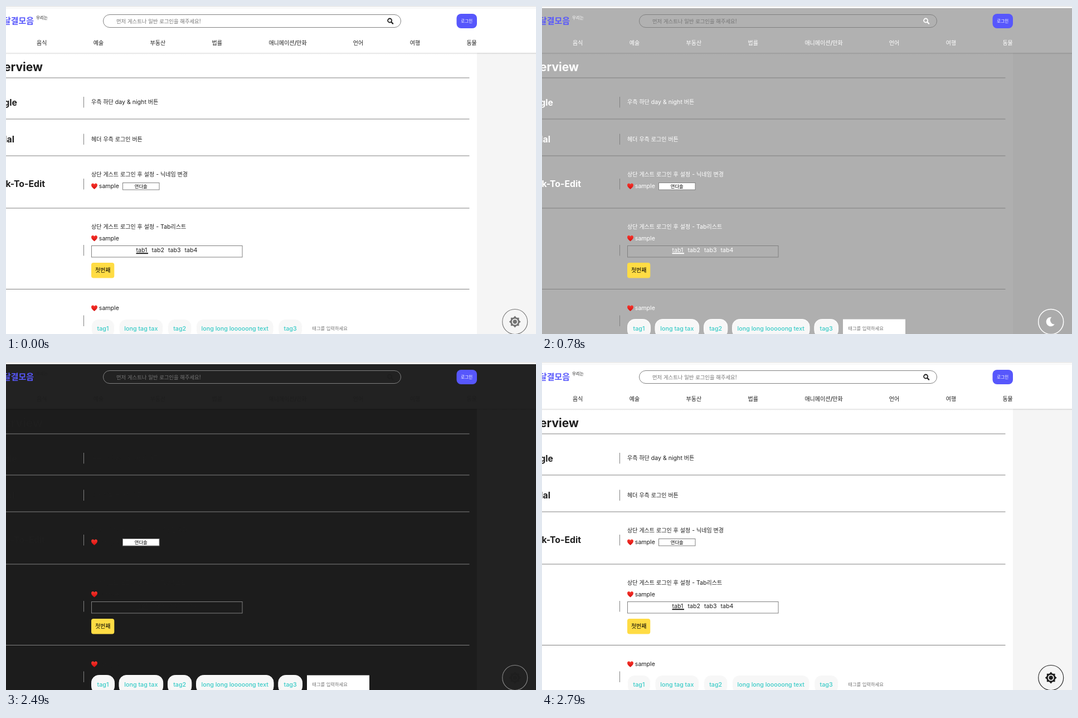
Write an HTML page that moves like this. It is 951 by 589 pixels and loops after 2850 ms.

```html
<!DOCTYPE html>
<html lang="ko">
<head>
<meta charset="utf-8">
<title>Day and night toggle</title>
<style>
  html, body { margin: 0; width: 100%; height: 100%; overflow: hidden; background: #fff; }
  svg { display: block; width: 951px; height: 589px; }
  text { font-family: Inter, "Noto Sans CJK KR", "Noto Sans CJK", sans-serif; white-space: pre; }
  .ink { fill: var(--ink); }
  .ink-line { fill: none; stroke: var(--ink); }
  .line { fill: none; stroke: #808080; }
</style>
</head>
<body>
<svg id="stage" viewBox="0 0 951 589">
  <defs>
    <linearGradient id="shade" x2="0" y2="1">
      <stop stop-opacity=".13"/>
      <stop offset="1" stop-opacity="0"/>
    </linearGradient>
    <linearGradient id="heartFill" x2="0" y2="1">
      <stop stop-color="#f8382e"/>
      <stop offset="1" stop-color="#d80f0f"/>
    </linearGradient>
  </defs>
</svg>
<script>
const LOOP = 2850, TICK = 30;
const HOVER = 390, TO_NIGHT = 660, TO_DAY = 2490;
const FADE_DELAY = 28, FADE = 262;
const HANGUL_SCALE = 0.945;
const BLUE = '#5757fc', TEAL = '#38cbc7', HINT = '#757575';
const stage = document.getElementById('stage');

function add(tag, attrs, parent = stage) {
  const node = document.createElementNS('http://www.w3.org/2000/svg', tag);
  for (const key in attrs) node.setAttribute(key, attrs[key]);
  parent.appendChild(node);
  return node;
}

const box = (x, y, width, height, attrs) => add('rect', { x, y, width, height, ...attrs });
const path = (d, attrs, parent) => add('path', { d, ...attrs }, parent);

// Hangul runs are set slightly smaller than the Latin beside them.
function label(x, y, string, size = 10.6, attrs = {}) {
  const node = add('text', { x, y, 'font-size': size, ...(attrs.fill ? {} : { class: 'ink' }), ...attrs });
  for (const run of string.match(/[가-힣]+|[^가-힣]+/g)) {
    const scale = /[가-힣]/.test(run) ? HANGUL_SCALE : 1;
    add('tspan', { 'font-size': size * scale }, node).textContent = run;
  }
  return node;
}

function sample(y) {
  path(`M158.5 ${y + 5.6}C155 ${y + 2.9} 153 ${y + .9} 153 ${y - 1.8}
    C153 ${y - 5.4} 157.2 ${y - 6} 158.5 ${y - 3}
    C159.8 ${y - 6} 164 ${y - 5.4} 164 ${y - 1.8}
    C164 ${y + .9} 162 ${y + 2.9} 158.5 ${y + 5.6}Z`, { fill: 'url(#heartFill)' });
  label(166.8, y + 4, 'sample');
}

function drawBackground() {
  box(0, 0, 951, 589, { fill: 'var(--page)' });
  box(845, 84, 106, 505, { fill: 'var(--side)' });
  box(0, 84, 951, 3, { fill: 'url(#shade)' });
  box(0, 4, 951, 80, { fill: 'var(--head)' });
  box(0, 0, 951, 4, { fill: '#fff' });
  box(0, 0, 951, 1, { fill: '#d8d8d8' });
  box(0, 3, 951, 1, { fill: '#ececec' });
}

function drawHeader() {
  label(50, 32, '달결모음', 15.8, { fill: BLUE, 'font-weight': 700, 'text-anchor': 'end' });
  label(54, 24, '우리는', 8);
  box(174.5, 15.5, 534, 23, { rx: 11.5, class: 'line' });
  label(198, 30.5, '먼저 게스트나 일반 로그인을 해주세요!', 9.9, { fill: HINT });
  add('circle', { cx: 688.6, cy: 26, r: 3.5, class: 'ink-line', 'stroke-width': 1.8 });
  path('M691.3 28.7L694.2 31.6', { class: 'ink-line', 'stroke-width': 2.2, 'stroke-linecap': 'round' });
  box(808.5, 14, 36.5, 26, { rx: 8, fill: BLUE });
  label(826.7, 29.5, '로그인', 8, { fill: '#fff', 'font-weight': 500, 'text-anchor': 'middle' });

  const menu = { 음식: 55, 예술: 156.8, 부동산: 258.6, 법률: 369.6, '애니메이션/만화': 471.4, 언어: 622.8, 여행: 724.8, 동물: 826.4 };
  for (const name in menu) label(menu[name], 70, name, 10.6, { 'font-weight': 500 });
}

function drawSections() {
  for (const y of [129, 203, 269, 363, 508.5]) path(`M0 ${y}H831.5`, { class: 'line' });
  for (const y of [163, 229.5, 310, 429, 555.5]) path(`M139.5 ${y}v19.5`, { class: 'line' });

  const title = { 'font-weight': 700, 'text-anchor': 'end' };
  label(66, 117.3, 'Overview', 21.1, title);
  label(20, 178.5, 'Toggle', 15.8, title);
  label(15, 245, 'Modal', 15.8, title);
  label(70, 325.3, 'Click-To-Edit', 15.8, title);

  label(153, 176, '우측 하단 day & night 버튼');
  label(153, 242.5, '헤더 우측 로그인 버튼');

  label(153, 306, '상단 게스트 로그인 후 설정 - 닉네임 변경');
  sample(323.3);
  box(209.5, 317.5, 65.5, 12.5, { class: 'line', style: 'fill:#fff' });
  label(242.3, 326.6, '연다솔', 8.8, { fill: '#000', 'text-anchor': 'middle' });

  label(153, 400, '상단 게스트 로그인 후 설정 - Tab리스트');
  sample(416.8);
  box(153.5, 430.5, 270.5, 20.5, { class: 'line' });
  [233.5, 261.5, 291, 320.6].forEach((x, i) => label(x, 441.5, 'tab' + (i + 1)));
  box(233.5, 443.2, 21.5, 2, { class: 'ink' });
  box(153, 461, 41.3, 27.5, { rx: 4, fill: '#ffdc44' });
  label(173.7, 478.3, '첫번째', 10.6, { fill: '#000', 'text-anchor': 'middle' });

  sample(542.3);
  const tags = [[153, 42, 'tag1'], [202.5, 79.7, 'long tag tax'], [290, 43.3, 'tag2'],
    [341, 139.5, 'long long looooong text'], [488.3, 43.7, 'tag3']];
  for (const [x, width, name] of tags) {
    box(x + .5, 562.5, width - 1, 33, { rx: 13, fill: '#f7f7f7', stroke: '#fff' });
    label(x + width / 2, 582.8, name, 10.7, { fill: TEAL, 'font-weight': 500, 'text-anchor': 'middle' });
  }
  box(540, 562.5, 112, 27, { fill: '#fff' });
  label(549.3, 581.7, '태그를 입력하세요', 8.8, { fill: HINT });
}

function drawToggle() {
  const group = add('g', { transform: 'translate(913.2 567)' });
  const ring = add('circle', { r: 22.5, fill: 'none' }, group);
  const teeth = Array.from({ length: 16 }, (_, i) => {
    const radius = i % 2 ? 7.9 : 10.4, angle = i * Math.PI / 8;
    return (radius * Math.cos(angle)).toFixed(2) + ' ' + (radius * Math.sin(angle)).toFixed(2);
  });
  const disc = r => `M${-r} 0a${r} ${r} 0 1 0 ${2 * r} 0a${r} ${r} 0 1 0 ${-2 * r} 0Z`;
  const sun = path(`M${teeth.join('L')}Z${disc(5.5)}${disc(3.7)}`, { class: 'ink', 'fill-rule': 'evenodd' }, group);
  const moon = path('M1.2 -8.2A8.3 8.3 0 1 0 6.6 4.6A7.4 7.4 0 0 1 1.2 -8.2Z', { class: 'ink' }, group);
  return { group, ring, sun, moon };
}

const clamp = v => Math.min(1, Math.max(0, v));
const gray = (from, to, k) => {
  const v = Math.round(from + (to - from) * k);
  return `rgb(${v},${v},${v})`;
};

drawBackground();
drawHeader();
drawSections();
const toggle = drawToggle();

function render(time) {
  const t = Math.floor(time / TICK) * TICK;
  const night = t >= TO_NIGHT && t < TO_DAY;
  const returning = t >= TO_DAY;
  const fade = clamp((t - (returning ? TO_DAY : TO_NIGHT) - FADE_DELAY) / FADE);
  const dark = returning ? 1 - fade : fade;

  const colors = {
    '--page': gray(255, 28, dark),
    '--head': gray(255, 34, dark),
    '--side': gray(245, 34, dark),
    '--ink': night ? '#fff' : '#1e1e1e'
  };
  for (const name in colors) stage.style.setProperty(name, colors[name]);

  toggle.group.setAttribute('opacity', t < HOVER ? 0.6 : 1);
  toggle.ring.setAttribute('stroke', night ? '#fff' : gray(34, 136, returning ? dark : 0));
  toggle.ring.setAttribute('stroke-width', night ? 1.5 : 1.1);
  toggle.sun.style.display = night ? 'none' : '';
  toggle.moon.style.display = night ? '' : 'none';
}

const start = performance.now();
function loop() {
  render((performance.now() - start) % LOOP);
  requestAnimationFrame(loop);
}
loop();
</script>
</body>
</html>
```
